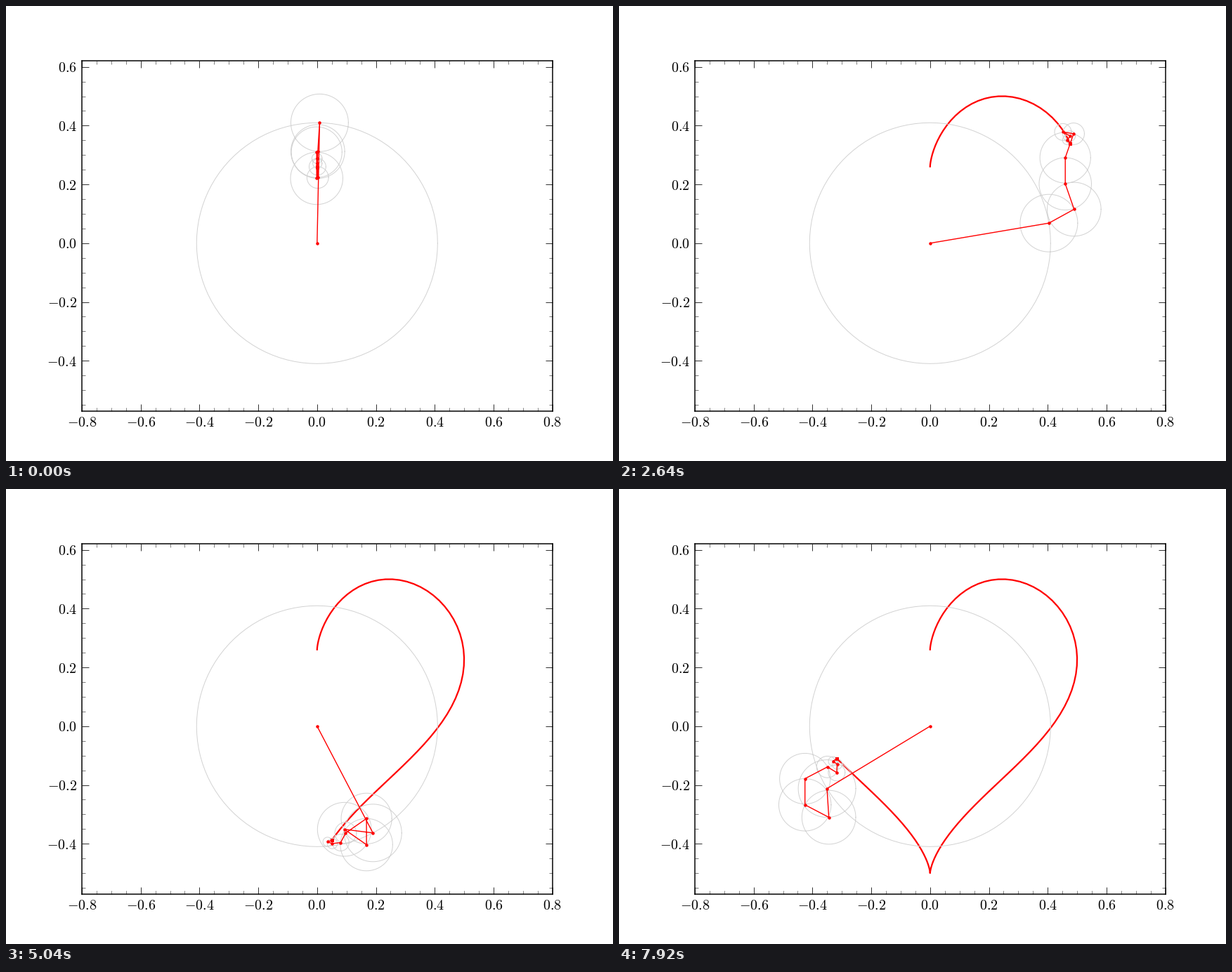
A matplotlib script that plays this animation: 864x648 px, repeating every 8000 ms.

```python
import numpy as np
import matplotlib.pyplot as plt
from matplotlib.animation import FuncAnimation
from matplotlib.ticker import MultipleLocator

plt.rcParams["mathtext.fontset"] = "cm"

SAMPLES = 150
FRAMES = 100
INTERVAL = 80

# Heart curve, normalised to a unit box and sampled with both end points
t = np.linspace(0, 2 * np.pi, SAMPLES)
x = 16 * np.sin(t) ** 3
y = 13 * np.cos(t) - 5 * np.cos(2 * t) - 2 * np.cos(3 * t) - np.cos(4 * t)


def normalise(v):
    return (v - v.min()) / (v.max() - v.min()) - 0.5


heart = normalise(x) + 1j * normalise(y)

# Fourier terms, largest radius first
coefs = np.fft.fft(heart) / SAMPLES
freqs = np.fft.fftfreq(SAMPLES, 1 / SAMPLES)
order = np.argsort(-np.abs(coefs), kind="stable")
coefs, freqs = coefs[order], freqs[order]
radii = np.abs(coefs)
ring = np.append(np.exp(1j * np.linspace(0, 2 * np.pi, 101)), np.nan)


def joints(n):
    arms = coefs * np.exp(2j * np.pi * freqs * n / SAMPLES)
    return np.concatenate([[0], np.cumsum(arms)])


fig = plt.figure(figsize=(12, 9), dpi=72, facecolor="white")
ax = fig.add_axes([0.125, 0.11, 0.775, 0.77])
scale = 669.6 / 1.6
ax.set_xlim(-0.8, 0.8)
ax.set_ylim((337.8 - 576.72) / scale, (337.8 - 77.76) / scale)

for axis in (ax.xaxis, ax.yaxis):
    axis.set_major_locator(MultipleLocator(0.2))
    axis.set_minor_locator(MultipleLocator(0.05))
    axis.set_major_formatter(lambda v, _: f"${round(v, 1) + 0:.1f}$")
ax.tick_params(which="both", direction="in", top=True, right=True)
ax.tick_params(which="major", length=10, width=0.8, labelsize=20, pad=7)
ax.tick_params(which="minor", length=5, width=0.5)
for spine in ax.spines.values():
    spine.set_linewidth(1.5)

trail, = ax.plot([], [], color="red", lw=2.25)
circles, = ax.plot([], [], color="lightgray", lw=1)
chain, = ax.plot([], [], "o-", color="red", lw=1.4, ms=4.5, mew=0)


def show(line, points):
    line.set_data(points.real, points.imag)


def update(n):
    points = joints(n)
    show(trail, heart[:n + 1])
    show(circles, (points[:-1, None] + radii[:, None] * ring).ravel())
    show(chain, points)
    return trail, circles, chain


anim = FuncAnimation(fig, update, frames=FRAMES, interval=INTERVAL,
                     init_func=lambda: update(0), repeat=True, repeat_delay=0)
plt.show()
```
